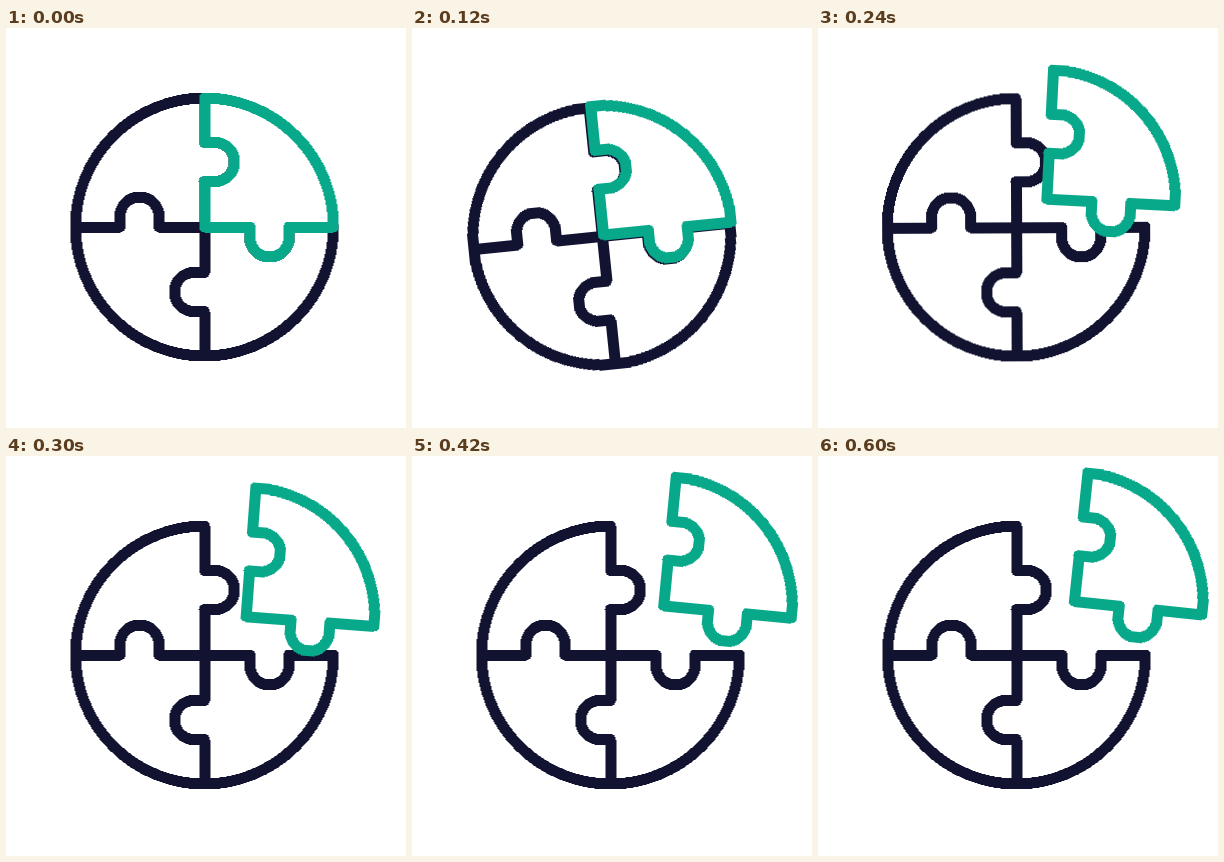
These frames come from a looping animation (400 px wide and 400 px high, 0.63 s). An HTML page:

```html
<!DOCTYPE html>
<html lang="en">
<head>
<meta charset="utf-8">
<title>Puzzle circle</title>
<style>
  html, body { margin: 0; width: 100%; height: 100%; overflow: hidden; background: #fff; }
  svg { display: block; width: 100%; height: 100%; }
  path {
    stroke-width: 11; stroke-linecap: round; stroke-linejoin: round;
    shape-rendering: crispEdges;
  }
  #base { fill: none; stroke: #121331; }
  #piece { fill: #fff; stroke: #08a88a; }
</style>
</head>
<body>
<svg viewBox="0 0 400 400">
  <g transform="translate(198.5 199)">
    <g id="wheel">
      <path id="base"/>
      <path id="piece"/>
    </g>
  </g>
</svg>
<script>
const LOOP = 630, STEP = 30, R = 129;
const $ = id => document.getElementById(id);

// One spoke with its knob, pointing up; quarter turns give the others.
const knob = [[0, -84.5], [10.5, -84.5], [10.5, -45.5], [0, -45.5]];
const turn = ([x, y], n) => n ? turn([-y, x], n - 1) : [x, y];

function spoke(n, outward) {
  const pts = [[0, -R], ...knob, [0, 0]].map(p => turn(p, n));
  if (outward) pts.reverse();
  const [a, b, c, d, e, f] = pts;
  return `${a} L${b} L${c} A19.5 19.5 0 0 ${outward ? 0 : 1} ${d} L${e} L${f}`;
}

$('base').setAttribute('d',
  [0, 1, 2, 3].map(n => 'M' + spoke(n)).join(' ') + ` M${R} 0 A${R} ${R} 0 1 1 0 ${-R}`);
$('piece').setAttribute('d',
  `M${spoke(0)} L${spoke(1, true)} A${R} ${R} 0 0 0 0 ${-R} Z`);

function bezier(x1, y1, x2, y2) {
  const at = (s, a, b) => 3 * s * (1 - s) * ((1 - s) * a + s * b) + s ** 3;
  return x => {
    let lo = 0, hi = 1;
    for (let i = 0; i < 30; i++) {
      const mid = (lo + hi) / 2;
      if (at(mid, x1, x2) < x) lo = mid; else hi = mid;
    }
    return at(lo, y1, y2);
  };
}

const span = (t, from, to) => Math.min(1, Math.max(0, (t - from) / (to - from)));
const smooth = x => (1 - Math.cos(Math.PI * x)) / 2;
const release = bezier(.2, .05, .2, 1);

const pose = (k, x, y, deg) =>
  `translate(${(k * x).toFixed(3)}px, ${(k * y).toFixed(3)}px) rotate(${(k * deg).toFixed(3)}deg)`;

// Wind up to the lower left and swing back, while the piece flies off.
const wheelPose = t =>
  pose(smooth(span(t, 0, 100)) - smooth(span(t, 100, 260)), -9, 9.3, -6.1);
const piecePose = t => pose(release(span(t, 100, 600)), 57.5, -54, 6);

function play(el, poseAt) {
  const frames = [];
  for (let t = 0; t < LOOP; t += STEP) {
    frames.push({
      offset: t ? t / LOOP - 1e-4 : 0,
      transform: poseAt(t),
      easing: 'steps(1, end)'
    });
  }
  frames.push({ offset: 1, transform: poseAt(LOOP - STEP) });
  el.animate(frames, { duration: LOOP, iterations: Infinity }).startTime = 0;
}

play($('wheel'), wheelPose);
play($('piece'), piecePose);
</script>
</body>
</html>
```
